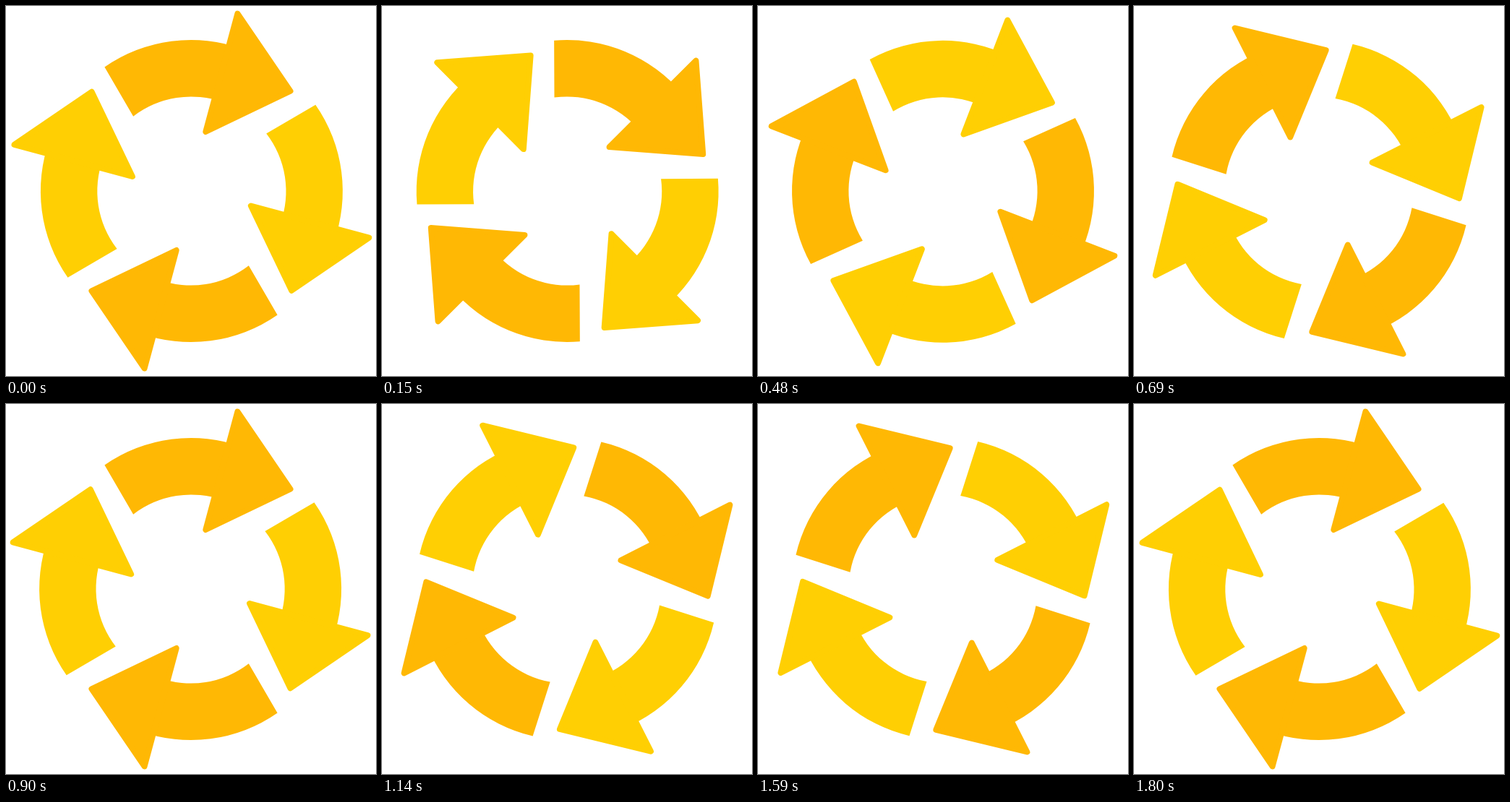
An HTML page with a canvas that plays this animation: 512 by 512 pixels, repeating every 1.83 s.

```html
<!DOCTYPE html>
<html lang="en">
<head>
<meta charset="utf-8">
<title>Cycle arrows</title>
<style>
  html, body { margin: 0; width: 100%; height: 100%; overflow: hidden; background: #fff; }
  canvas { display: block; width: 100vw; height: 100vh; }
</style>
</head>
<body>
<canvas id="stage" width="512" height="512"></canvas>
<script>
const ctx = document.getElementById('stage').getContext('2d');
const ORANGE = '#ffb804', YELLOW = '#ffcf03';
const STEP = 30, STEPS = 61, TURN = 6;
const OUTER = 209, INNER = 130.6;
const rad = deg => deg * Math.PI / 180;

// Curved band, running on underneath the head
const band = new Path2D();
band.arc(0, 0, OUTER, rad(-124.9), rad(-70));
band.arc(0, 0, INNER, rad(-70), rad(-127.7), true);
band.closePath();

// Head triangle; a round-joined stroke softens its corners
const head = new Path2D();
head.moveTo(64.4, -245.4);
head.lineTo(137.5, -138.3);
head.lineTo(20.3, -82);
head.closePath();

function arrow(color, angle) {
  ctx.save();
  ctx.rotate(rad(angle));
  ctx.fillStyle = ctx.strokeStyle = color;
  ctx.fill(band);
  ctx.fill(head);
  ctx.stroke(head);
  ctx.restore();
}

function draw(time) {
  const step = Math.floor(time / STEP) % STEPS;
  ctx.setTransform(1, 0, 0, 1, 0, 0);
  ctx.fillStyle = '#fff';
  ctx.fillRect(0, 0, 512, 512);
  ctx.translate(256, 256);
  ctx.rotate(rad(step * TURN));
  ctx.lineWidth = 8;
  ctx.lineJoin = 'round';
  arrow(ORANGE, 0);
  arrow(ORANGE, 180);
  // The yellow pair sits slightly off the pivot
  ctx.translate(0.9, 0.25);
  arrow(YELLOW, 90);
  arrow(YELLOW, 270);
}

const start = performance.now();
function loop() {
  draw(performance.now() - start);
  requestAnimationFrame(loop);
}
loop();
</script>
</body>
</html>
```
